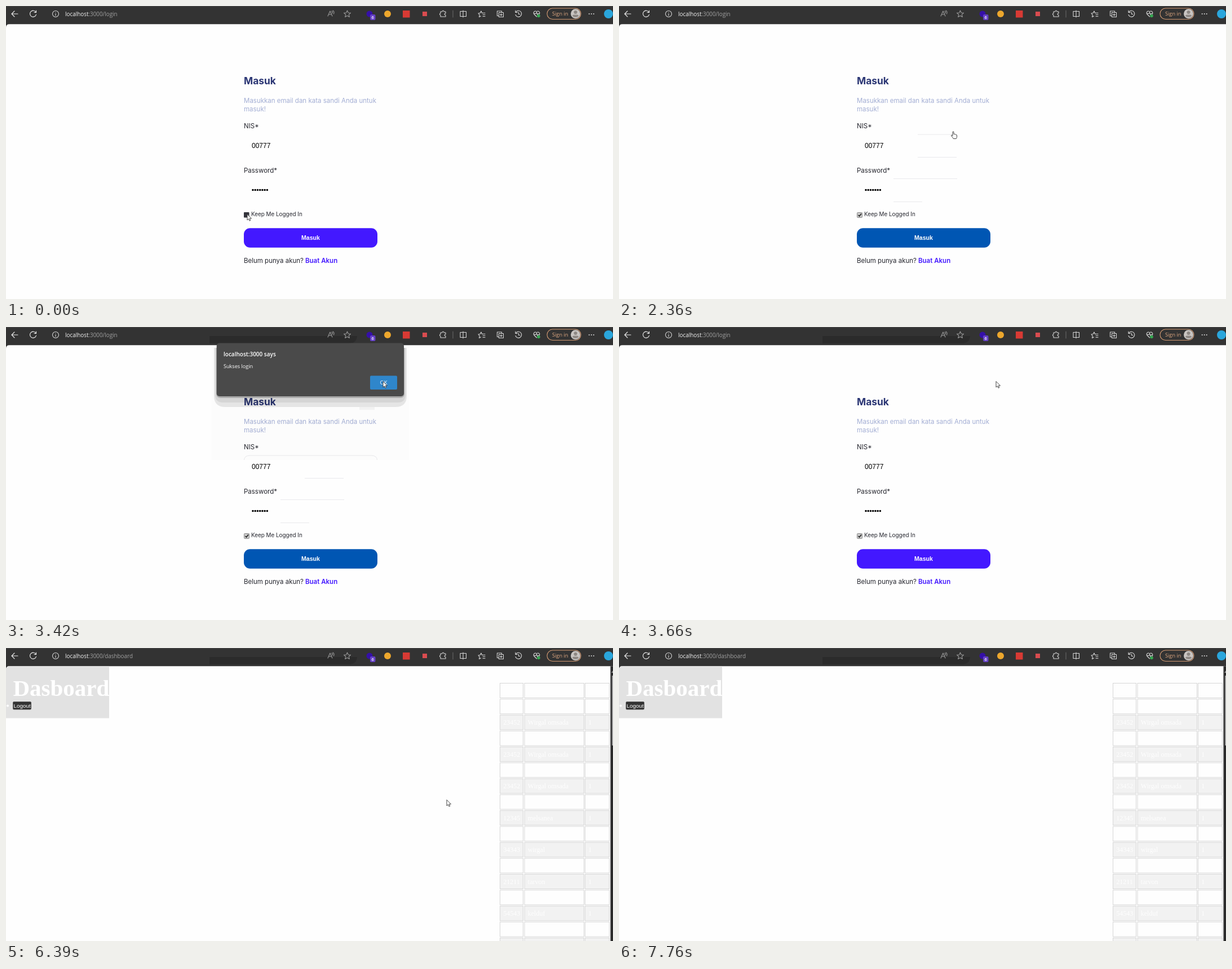
Recreate the animation shown at these times as an HTML page. Size 1077x520 px, loop 8.22 s.

```html
<!DOCTYPE html>
<html lang="id">
<head>
<meta charset="utf-8">
<style>
html, body { margin: 0; width: 100%; height: 100%; overflow: hidden; background: #fefefe; }
svg { display: block; width: 1077px; height: 520px; }
text { white-space: pre; }
.ui { font-family: "Open Sans", sans-serif; }
.form { font-family: Inter, sans-serif; font-size: 11.5px; fill: #25262e; }
.arial { font-family: "Liberation Sans", Arial, sans-serif; }
.times { font-family: "Liberation Serif", "Times New Roman", serif; }
.icon { fill: none; stroke: #d6d6d6; stroke-width: 1.1; stroke-linejoin: round; stroke-linecap: round; }
.border { fill: none; stroke: #e9e9ec; }
.cell { stroke: #d6d6d6; }
</style>
</head>
<body>
<svg viewBox="0 0 1077 520">
  <rect width="1077" height="520" fill="#333"/>
  <rect width="1077" height="1" fill="#474747"/>
  <path id="smear" d="M361 16H623Q622 29 608 29H361Z" fill="#2b2b2b"/>
  <path id="page" d="M0 520V38Q0 32.300 6 32.300H1077V520Z" fill="#fefefe"/>

  <g id="toolbar">
    <g class="icon">
      <path d="M21 14H10M15 9L10 14L15 19" stroke="#eee"/>
      <path d="M53 11A5.6 5.6 0 1 0 53.6 15M53.5 8V11.5H50" stroke="#eee"/>
      <circle cx="88" cy="14" r="5.5"/><path d="M88 13.5V17M88 11V11.2"/>
      <path d="M571 18L575 9L579 18M572.5 15H577.5M578 9Q580 10.5 579 13M580 8Q583 10 581.5 14" stroke="#999"/>
      <path d="M605.5 8L607.3 12L611.5 12.4L608.3 15.2L609.3 19.5L605.5 17.2L601.7 19.5L602.7 15.2L599.5 12.4L603.7 12Z" stroke="#999"/>
      <path d="M771 10H774Q774 8 775.5 8T777 10H780V13Q778 13 778 14.5T780 16V19H771V16Q769.5 16 769.5 14.5T771 13Z"/>
      <path d="M793 8V20" stroke="#666"/>
      <path d="M810 9.5H806V18.5H810M812 9.5H816.5V18.5H812M811 8V20"/>
      <path d="M842.5 18L839.5 19.5L840.3 15.8L838 13L841.3 12.5L843 9L844.6 12.5H850M846 15.5H850M846 18.5H850"/>
      <path d="M874 17.5H871.5V9H879.5V11.5M874.5 11.5H882.5V19.5H874.5ZM878.5 13.5V17.5M876.5 15.5H880.5"/>
      <path d="M904.5 11A5.5 5.5 0 1 1 904 15.5M904 8V11.5H907.5M909.5 11V14.5H912"/>
      <path d="M941.5 19L937 14.5C934.5 11 939 6.8 941.5 10.5C944 6.8 948.5 11 946 14.5M936.5 13.5H940L941.5 11.5L943 15.5L944 13.5H946"/>
      <rect x="960" y="4" width="60" height="19.5" rx="9.75" stroke="#d39a72"/>
    </g>
    <circle cx="945" cy="17.5" r="2.8" fill="#36a852"/>
    <circle cx="645" cy="14" r="5.5" fill="#3510a8"/>
    <rect x="646" y="15" width="9.5" height="10" rx="2" fill="#6541c6"/>
    <text class="ui" x="650.7" y="23" font-size="7.5" font-weight="600" text-anchor="middle" fill="#fff">6</text>
    <circle cx="677" cy="14" r="6" fill="#eda72d"/>
    <rect x="704" y="8" width="12.5" height="12.5" fill="#d83a34"/>
    <rect x="739" y="10" width="8" height="8" fill="#d94c50"/>
    <text class="ui" x="969" y="17" font-size="9.2" fill="#e0a982">Sign in</text>
    <circle cx="1010.5" cy="13.8" r="8.5" fill="#c9c5c2"/>
    <circle cx="1010.5" cy="11" r="3" fill="#8d8884"/>
    <path d="M1005 18Q1005 15.5 1007.5 15.5H1013.5Q1016 15.5 1016 18Q1010.5 22 1005 18" fill="#8d8884"/>
    <g fill="#ddd"><circle cx="1034.7" cy="14" r="1"/><circle cx="1038.7" cy="14" r="1"/><circle cx="1042.7" cy="14" r="1"/></g>
    <circle cx="1069" cy="14" r="8" fill="#2aa6dc"/>
    <text class="ui" x="105" y="17.5" font-size="9.9" fill="#f3f3f3">localhost<tspan id="route" fill="#a0a0a0"></tspan></text>
  </g>

  <g id="login">
    <g class="form">
      <text x="422" y="139" style="font-size:17.4px;font-weight:700;fill:#2b3674">Masuk</text>
      <text x="422" y="171.5" style="fill:#a3aed4">Masukkan email dan kata sandi Anda untuk</text>
      <text x="422" y="186.5" style="fill:#a3aed4">masuk!</text>
      <text x="422" y="217">NIS*</text>
      <text x="422" y="296">Password*</text>
      <text x="435" y="373.3" style="font-size:9.9px">Keep Me Logged In</text>
      <text x="422" y="455.5">Belum punya akun?</text>
      <text x="531" y="455.5" style="font-weight:600;fill:#4318ff">Buat Akun</text>
    </g>
    <text class="arial" x="436" y="252" font-size="12">00777</text>
    <path d="M438 326.5H464" stroke="#000" stroke-width="3.6" stroke-linecap="round" stroke-dasharray="0 4.23"/>
    <g class="border">
      <path id="passwordBottom" d="M487 347.5H538"/>
      <path id="passwordTop" d="M487 306.5H600"/>
      <path id="nisBottom" d="M530 268.5H599"/>
      <path id="nisTop" d="M530 228H600"/>
      <path id="nisTopFull" d="M422.5 236Q423 228 433 228H648Q658 228 658.5 236"/>
    </g>
    <rect id="pressed" x="422" y="366" width="9.5" height="9.5" rx="1" fill="#33343b"/>
    <g id="checked">
      <rect x="422.5" y="366.5" width="9" height="9" rx="1" fill="#c8c8c8" stroke="#8a8a8a"/>
      <path d="M424.5 371L426.5 373L430 368.5" fill="none" stroke="#222" stroke-width="1.6"/>
    </g>
    <rect id="submit" x="422" y="394.2" width="237" height="34.6" rx="11"/>
    <text class="arial" x="540.5" y="415" font-size="10.6" font-weight="700" text-anchor="middle" fill="#fff">Masuk</text>
  </g>

  <g id="shadow">
    <rect x="365" y="33" width="350" height="203" opacity=".008"/>
    <path d="M369 37V122Q369 142 389 142H691Q711 142 711 122V37Z" opacity=".09"/>
    <path d="M371 37V120Q371 134 385 134H695Q709 134 709 120V37Z" opacity=".07"/>
    <path d="M373 37V118Q373 126 381 126H699Q707 126 707 118V37Z" opacity=".2"/>
    <rect x="627" y="142" width="27" height="5" fill="#f2f2f2"/>
  </g>
  <g id="dialog" class="ui" fill="#fff">
    <rect x="373.7" y="28.5" width="332.3" height="94.5" rx="5" fill="#4a4a4a"/>
    <text x="386" y="52" font-size="10" font-weight="600">localhost:3000 says</text>
    <text x="386" y="73" font-size="9.1">Sukses login</text>
    <rect id="ok" x="646" y="86.6" width="48" height="24.4" rx="2"/>
    <text x="670" y="102" font-size="9.3" text-anchor="middle">OK</text>
  </g>

  <g id="dashboard">
    <path d="M0 124.5V38Q0 32.3 6 32.3H183V124.5Z" fill="#e2e2e2"/>
    <text class="times" x="12.5" y="85" font-size="41" font-weight="700" fill="#fff">Dasboard</text>
    <circle cx="3" cy="102.5" r="2" fill="#fff"/>
    <rect x="12.5" y="95.5" width="32" height="13.5" rx="1.5" fill="#333" stroke="#555"/>
    <text class="arial" x="13.5" y="106" font-size="9.9" fill="#fff">Logout</text>
  </g>
  <g id="emptyTable" fill="#fefefe">
    <rect class="cell" x="960.5" y="62.5" width="32" height="26"/>
    <rect class="cell" x="994.5" y="62.5" width="42" height="26"/>
    <rect class="cell" x="1038.5" y="62.5" width="42" height="26"/>
  </g>
  <g id="table" class="times" font-size="12"></g>
  <g id="scrollbar">
    <rect x="1072.5" y="32.3" width="5" height="488" fill="#2c2c2c"/>
    <rect x="1075" y="49" width="2" height="124" fill="#9a9a9a"/>
    <path d="M1074 44L1077 40V44Z" fill="#9a9a9a"/>
  </g>

  <g id="cursor" fill="#fff" stroke="#333" stroke-width=".9" stroke-linejoin="round">
    <path id="arrow" d="M0 0V10.5L2.5 8.3L4 11.8L5.8 11L4.2 7.6H7.5Z"/>
    <path id="hand" d="M3 7V1.5Q3 .3 4 .3T5 1.5V5Q6.5 4.2 7 5.3Q8.3 4.7 8.8 6Q10.5 5.6 10.5 7.5V9.5Q10.5 11 9.3 13H4.3Q3.5 11 1 8.5Q0 7.3 1 6.7T3 8Z"/>
  </g>
</svg>
<script>
const LOOP = 8220, ROW_TOP = 62, ROW_PITCH = 28.25, ROW_COUNT = 17;
const el = Object.fromEntries([...document.querySelectorAll('[id]')].map(e => [e.id, e]));
const show = (id, on) => el[id].style.display = on ? '' : 'none';
const fill = (id, color) => el[id].setAttribute('fill', color);

// Grey rows each follow a white row with the same entry.
const people = [['NIS', 'Nama'], ['23452', 'Wirgal omsada'], ['23452', 'Wirgal omsada'], ['23452', 'Wirgal omsada'],
  ['12345', 'melsanea'], ['34343', 'wirgal'], ['21211', 'tarvon'], ['54543', 'kelduf'], ['54543', 'kelduf']];
const columns = [[876, 42], [919.5, 106.5], [1027, 44]];
const rowColor = i => i && i % 2 === 0 ? '#f2f2f2' : '#fefefe';
for (let i = 0; i < ROW_COUNT; i++) {
  const y = ROW_TOP + i * ROW_PITCH;
  const [nis, name] = people[Math.ceil(i / 2)];
  const cells = [nis, name, '1'].map((label, c) => {
    const [x, width] = columns[c];
    return `<rect class="cell" x="${x + .5}" y="${y + .5}" width="${width - 1}" height="26"/>` +
      `<text x="${x + 6.3}" y="${y + 17.5}" fill="#fefefe">${label}</text>`;
  });
  el.table.insertAdjacentHTML('beforeend', `<g>${cells.join('')}</g>`);
}

// Each leg: start, end, number of steps, evenly timed waypoints.
const legs = [
  [120, 850, 6, [[428, 369], [500, 405]]],
  [1520, 2480, 8, [[500, 405], [505, 365], [522, 316], [570, 248], [608, 196]]],
  [2640, 3660, 9, [[608, 196], [640, 141], [660, 108], [669, 96], [669, 96]]],
  [3830, 3960, 2, [[669, 96], [674, 99]]],
  [4230, 4620, 4, [[674, 99], [664, 110], [659, 116], [657, 118], [657, 118]]],
  [4910, 5470, 5, [[657, 118], [688, 145], [683, 150]]],
  [5900, 6830, 8, [[683, 150], [710, 178], [755, 236], [809, 302], [890, 440]]],
  [6950, 7760, 7, [[890, 440], [905, 465], [925, 500], [940, 522]]]
];

function cursorAt(t) {
  const leg = legs.findLast(l => t >= l[0]);
  if (!leg) return legs[0][3][0];
  const [start, end, steps, points] = leg;
  const step = Math.floor((t - start) / (end - start) * (steps - 1) + .35) + 1;
  const position = Math.min(1, step / steps) * (points.length - 1);
  const i = Math.min(Math.floor(position), points.length - 2);
  return points[i].map((v, axis) => v + (points[i + 1][axis] - v) * (position - i));
}

function render(t) {
  const [x, y] = cursorAt(t);
  const between = (a, b) => t >= a && t < b;
  const loaded = t >= 4620;

  el.route.textContent = t < 4230 ? ':3000/login' : ':3000/dashboard';
  show('smear', t >= 2640);
  show('login', t < 3830);
  show('pressed', t < 120);
  show('checked', t >= 120);
  fill('submit', between(600, 3660) ? '#0056b3' : '#4318ff');
  show('passwordBottom', between(1650, 3660));
  show('passwordTop', between(1920, 3660));
  show('nisBottom', between(2190, 3660));
  show('nisTop', between(2330, 2640));
  show('nisTopFull', between(2640, 3660));

  show('dialog', between(2480, 3660));
  show('shadow', between(2640, 3660));
  fill('ok', y < 111 ? '#2f86cb' : '#3f97dc');

  show('dashboard', t >= 3960);
  show('emptyTable', between(4480, 4620));
  show('table', loaded);
  show('scrollbar', loaded);
  const hovered = loaded && t < 7760 && x > 876 ? Math.floor((y - ROW_TOP) / ROW_PITCH) : -1;
  [...el.table.children].forEach((row, i) => row.setAttribute('fill', i === hovered ? '#ddd' : rowColor(i)));

  const hand = between(600, 2480);
  show('cursor', t < 7760);
  show('hand', hand);
  show('arrow', !hand);
  el.cursor.setAttribute('transform', `translate(${x} ${y + .5})`);
}

const startTime = performance.now();
function frame() {
  render((performance.now() - startTime) % LOOP);
  requestAnimationFrame(frame);
}
frame();
</script>
</body>
</html>
```
